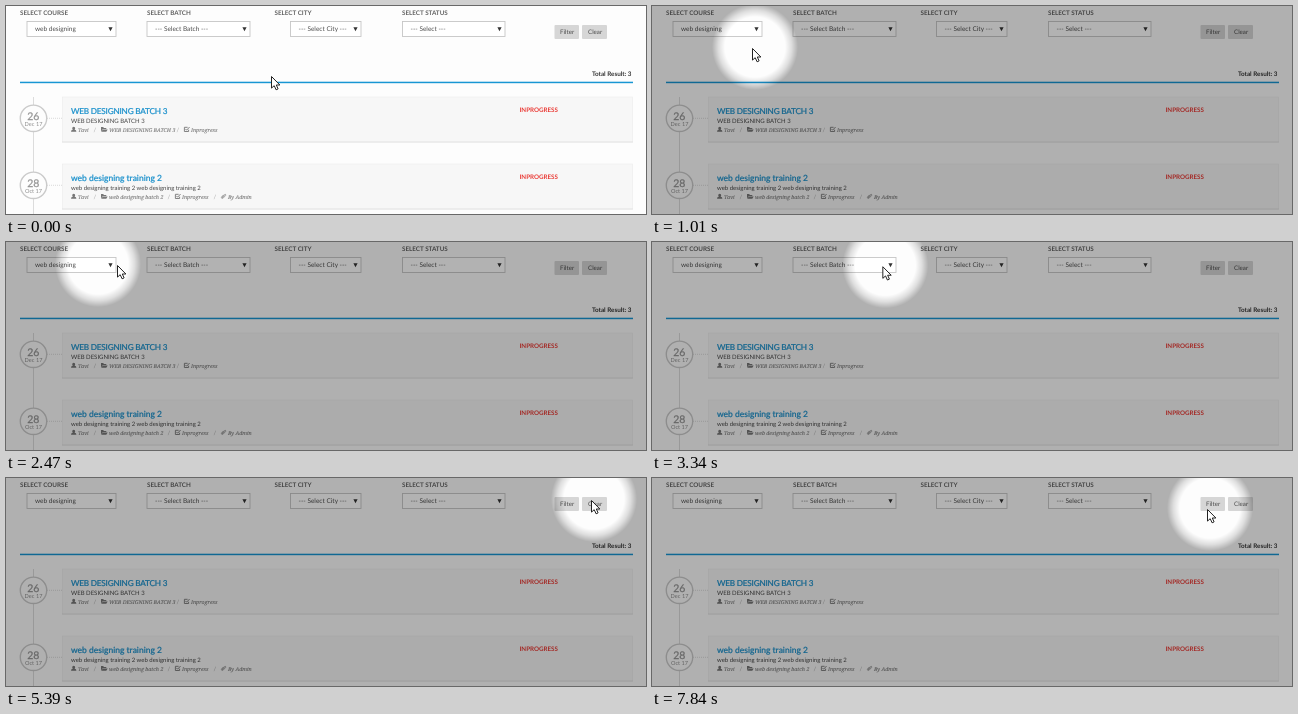
An HTML page with a canvas that plays this animation: 640x208 px, repeating every 8000 ms.

```html
<!DOCTYPE html>
<html lang="en">
<head>
<meta charset="utf-8">
<title>Course filter</title>
<style>
html, body { margin: 0; width: 100%; height: 100%; overflow: hidden; background: #fdfdfd; }
svg, canvas { position: absolute; left: 0; top: 0; width: 640px; height: 208px; display: block; }
text { font-family: Lato, "Open Sans", sans-serif; text-rendering: geometricPrecision; white-space: pre; }
.label { font-size: 6.3px; font-weight: 700; fill: #626262; }
.option { font-size: 6.5px; fill: #4c4c4c; }
.button { font-size: 6.2px; fill: #4c4c4c; }
.total { font-size: 6.3px; font-weight: 700; fill: #333; }
.day { font-size: 10.5px; fill: #929292; stroke: #929292; stroke-width: .25px; text-anchor: middle; }
.month { font-size: 5.6px; fill: #8c8c8c; text-anchor: middle; }
.title { font-size: 8.5px; fill: #178fcb; stroke: #178fcb; stroke-width: .22px; }
.caps { font-size: 8.2px; letter-spacing: -.2px; }
.desc { font-size: 6px; fill: #444; }
.meta { font: italic 5.3px "Noto Serif", serif; fill: #777; stroke: #777; stroke-width: .08px; }
.slash { font-size: 6px; fill: #aaa; }
.status { font-size: 6.24px; font-weight: 700; fill: #ea3a35; }
</style>
</head>
<body>
<svg id="page" viewBox="0 0 640 208"></svg>
<canvas id="overlay"></canvas>
<script>
const page = document.getElementById('page');
const overlay = document.getElementById('overlay');
const ctx = overlay.getContext('2d');
const W = 640, H = 208, LOOP = 8000;

function add(tag, attrs, content) {
  const el = document.createElementNS('http://www.w3.org/2000/svg', tag);
  for (const key in attrs) el.setAttribute(key, attrs[key]);
  if (content) el.textContent = content;
  page.appendChild(el);
}
const text = (cls, x, y, content) => add('text', { class: cls, x, y }, content);
const rect = (x, y, width, height, fill, more) => add('rect', { x, y, width, height, fill, ...more });
const path = (d, fill, more) => add('path', { d, fill, ...more });

function select(label, labelX, x, right, option) {
  text('label', labelX, 8.8, label);
  rect(x, 15.5, right - x, 15, '#fff', { stroke: '#c6c6c6', 'stroke-width': .9 });
  text('option', x + 8, 25.3, option);
  path(`M${right - 7.6} 21.2h4.2l-2.1 4z`, '#333');
}

function button(x, width, label, labelX) {
  rect(x, 19, width, 14, '#d6d6d6', { rx: 1 });
  text('button', labelX, 28.4, label);
}

const icons = {
  user: (x, y) => path(`M${x + 2.7} ${y - 5}a1.5 1.6 0 0 1 0 3.2a1.5 1.6 0 0 1 0-3.2M${x} ${y}q0-2 1.7-2h2q1.7 0 1.7 2z`, '#777'),
  folder: (x, y) => path(`M${x} ${y}v-4.6h2.2l.7.8h2.4v1h-3.6zM${x + .4} ${y}l1.3-2.3h5l-1.4 2.3z`, '#777'),
  check: (x, y) => path(`M${x + 4.6} ${y - 2}v1.8h-4.2v-4.2h3.2M${x + 1.4} ${y - 2.8}l1.2 1.3l3-3.2`, 'none',
    { stroke: '#777', 'stroke-width': .9 }),
  clip: (x, y) => path(`M${x + 3.7} ${y - 3.3}l-2 2.1q-.8.4-.5-.5l2.3-2.4q1.5-.9 1.2.8l-2.5 2.7q-1.8 1-1.9-.9l2.2-2.4`, 'none',
    { stroke: '#777', 'stroke-width': .6 })
};

function entry(y, day, month, title, titleClass, desc, meta) {
  path(`M41 ${y + 21.3}H56`, 'none', { stroke: '#ccc', 'stroke-width': .7, 'stroke-dasharray': '1 1' });
  add('circle', { cx: 27.5, cy: y + 21.3, r: 13.2, fill: '#fdfdfd', stroke: '#cacaca', 'stroke-width': 1.4 });
  text('day', 27.3, y + 22.8, day);
  text('month', 27.5, y + 29.3, month);
  rect(56.5, y, 570, 45, '#f7f7f7', { stroke: '#ededed', 'stroke-width': .7 });
  path(`M56 ${y + 45}H627`, 'none', { stroke: '#dedede', 'stroke-width': .8 });
  text('title ' + titleClass, 65, y + 16.7, title);
  text('desc', 65, y + 26.4, desc);
  text('status', 513.5, y + 14.5, 'INPROGRESS');
  meta.forEach(([icon, iconX, labelX, label], i) => {
    icons[icon](iconX, y + 34.7);
    text('meta', labelX, y + 34.8, label);
    if (i) text('slash', iconX - 7.5, y + 34.8, '/');
  });
}

select('SELECT COURSE', 14, 21, 110, 'web designing');
select('SELECT BATCH', 141, 141, 244, '--- Select Batch ---');
select('SELECT CITY', 268.5, 284.5, 355, '--- Select City ---');
select('SELECT STATUS', 396, 396.5, 499, '--- Select ---');
button(548.5, 24.5, 'Filter', 554);
button(576, 25, 'Clear', 582);
text('total', 586, 70, 'Total Result: 3');
rect(14, 75.7, 613, 1.5, '#1896d3');
rect(27, 91, .9, 117, '#d9d9d9');
entry(91, '26', 'Dec 17', 'WEB DESIGNING BATCH 3', 'caps', 'WEB DESIGNING BATCH 3', [
  ['user', 65, 72, 'Tavi'],
  ['folder', 95, 103, 'WEB DESIGNING BATCH 3'],
  ['check', 178, 185, 'Inprogress']
]);
entry(158, '28', 'Oct 17', 'web designing training 2', '',
  'web designing training 2 web designing training 2', [
  ['user', 65, 72, 'Tavi'],
  ['folder', 95, 103, 'web designing batch 2'],
  ['check', 169, 176, 'Inprogress'],
  ['clip', 215, 222, 'By Admin']
]);

// Screen refresh times: first, last, count
const runs = [
  [0, 0, 1], [20, 1010, 8], [1140, 2080, 8], [2200, 2470, 3], [2620, 3190, 5],
  [3340, 4180, 8], [4330, 4330, 1], [4480, 5390, 8], [5520, 5520, 1],
  [5640, 6520, 8], [6640, 6640, 1], [6760, 7690, 8], [7840, 7840, 1]
];
const ticks = runs.flatMap(([a, b, n]) =>
  Array.from({ length: n }, (_, i) => n > 1 ? a + (b - a) * i / (n - 1) : a));

// Pointer path: time, x, y
const route = [
  [0, 265, 70], [160, 258, 68], [1010, 100, 42], [1140, 98, 41], [1750, 42, 24],
  [2200, 52, 24], [2470, 111, 23], [3190, 202, 25], [4180, 389, 20], [4330, 407, 21],
  [5200, 580, 21], [5390, 585, 22], [5520, 582, 23], [6520, 571, 28],
  [6640, 561, 30], [7690, 555, 30], [7840, 555, 31]
];

function pointAt(t) {
  let i = 0;
  while (i < route.length - 1 && route[i + 1][0] <= t) i++;
  const a = route[i], b = route[i + 1] || a;
  const k = b === a ? 0 : (t - a[0]) / (b[0] - a[0]);
  return { x: a[1] + (b[1] - a[1]) * k, y: a[2] + (b[2] - a[2]) * k };
}

function drawLight(x, y, fade) {
  ctx.fillStyle = `rgba(0,0,0,${.3 * fade})`;
  ctx.fillRect(0, 0, W, H);
  const glow = ctx.createRadialGradient(x, y, 0, x, y, 43);
  glow.addColorStop(0, '#000');
  glow.addColorStop(.7, '#000');
  glow.addColorStop(.85, 'rgba(0,0,0,.6)');
  glow.addColorStop(1, 'rgba(0,0,0,0)');
  ctx.globalCompositeOperation = 'destination-out';
  ctx.fillStyle = glow;
  ctx.fillRect(x - 44, y - 44, 88, 88);
  ctx.globalCompositeOperation = 'source-over';
}

const arrow = new Path2D('M0 0V11.6L2.7 9.2L4.6 13.3L6.6 12.4L4.8 8.5H8.4Z');
function drawPointer(x, y) {
  ctx.save();
  ctx.translate(x + .5, y + .5);
  ctx.fillStyle = '#fff';
  ctx.fill(arrow);
  ctx.strokeStyle = '#222';
  ctx.lineWidth = 1;
  ctx.stroke(arrow);
  ctx.restore();
}

const scale = window.devicePixelRatio || 1;
overlay.width = W * scale;
overlay.height = H * scale;
ctx.scale(scale, scale);

function draw(now) {
  const time = now % LOOP;
  const t = ticks.filter(tick => tick <= time + .01).pop();
  const p = pointAt(t);
  // The light trails behind the pointer on its quick move right.
  const lag = 22 * Math.max(0, 1 - Math.abs(t - 2470) / 270);
  ctx.clearRect(0, 0, W, H);
  drawLight(p.x + 3 - lag, p.y - 1, Math.min(1, t / 500));
  drawPointer(p.x, p.y);
}

const start = performance.now();
function frame() {
  draw(performance.now() - start);
  requestAnimationFrame(frame);
}
frame();
</script>
</body>
</html>
```
